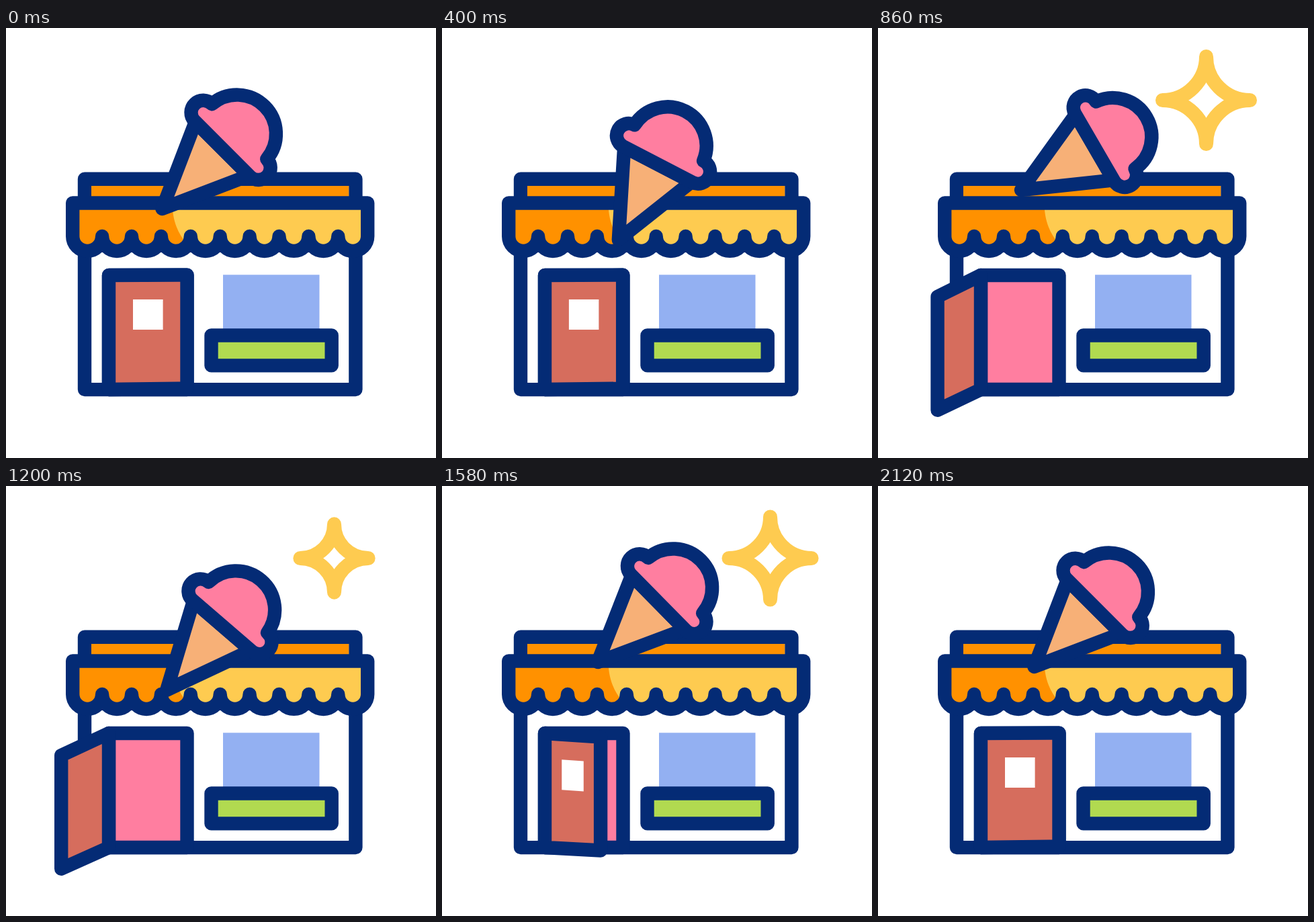
Write an HTML page that moves like this. It is 640 px wide and 640 px high and loops after 2400 ms.

```html
<!DOCTYPE html>
<html lang="en">
<head>
<meta charset="utf-8">
<title>Ice cream shop</title>
<style>
  html, body { margin: 0; height: 100%; overflow: hidden; background: #fff; }
  svg { display: block; width: 100vw; height: 100vh; }
  .line { stroke: #042b75; stroke-width: 20.4; stroke-linejoin: round; stroke-linecap: round; }
  .white { fill: #fff; }
  .orange { fill: #ff9100; }
  .yellow { fill: #fecb50; }
  .pink { fill: #ff7ea0; }
  .peach { fill: #f7b077; }
  .brown { fill: #d66d5d; }
  .blue { fill: #93b0f2; }
  .green { fill: #b1da50; }
  .none { fill: none; }
  #star { fill: none; stroke: #fecb50; stroke-width: 21; stroke-linejoin: round; stroke-linecap: round; }
</style>
</head>
<body>
<svg viewBox="0 0 640 640">
  <clipPath id="cut"><path class="awning"/></clipPath>

  <rect class="line white" x="117" y="224.8" width="403.4" height="313.3"/>
  <rect class="orange" x="127" y="235" width="383.2" height="22"/>

  <path class="awning yellow"/>
  <path class="orange" clip-path="url(#cut)" d="M90 250H247.5V262C248 284 254 303 268 320V345H90Z"/>
  <path class="awning line none"/>

  <rect class="blue" x="323" y="367.3" width="143.5" height="85"/>
  <rect class="line green" x="305.5" y="457.5" width="179.2" height="44.9"/>

  <rect class="line pink" x="153" y="368" width="116.5" height="170"/>
  <polygon id="leaf" class="line brown"/>
  <polygon id="pane" class="white"/>

  <g id="cone">
    <path class="line peach" d="M0 123.6L-56.4 -2.8H56.4Z"/>
    <path class="line pink" d="M-58.5 -2.8A18 18 0 0 1 -57.8 -38.8A58 58 0 0 1 57.8 -38.8A18 18 0 0 1 58.5 -2.8Z"/>
  </g>

  <path id="star"/>
</svg>
<script>
  const LOOP = 2400, STEP = 20;
  const $ = id => document.getElementById(id);
  const set = (id, name, value) => $(id).setAttribute(name, value);
  const show = (id, on) => $(id).style.display = on ? '' : 'none';

  // Eased progress from 0 to 1 between two times
  function ease(t, from, to) {
    const u = Math.min(1, Math.max(0, (t - from) / (to - from)));
    return (1 - Math.cos(Math.PI * u)) / 2;
  }

  // Eases through the turning points [time, value] of a swing
  function swing(t, ...turns) {
    return turns.slice(1).reduce((sum, [time, value], i) =>
      sum + (value - turns[i][1]) * ease(t, turns[i][0], time), turns[0][1]);
  }

  function drawCone(t) {
    const y = swing(t, [0, 181.6], [260, 217], [690, 168.7], [1200, 210.1], [1660, 172.6], [2120, 181.6]);
    const angle = swing(t, [0, 45], [400, 27.5], [880, 60], [1340, 35.6], [1800, 54], [2120, 45]);
    set('cone', 'transform', `translate(319.9 ${y}) rotate(${angle})`);
  }

  // The leaf and its pane shear as they turn on the left hinge
  function drawDoor(t) {
    const p = ease(t, 385, 935) - ease(t, 1160, 1740);
    const x = 269.5 - 189.5 * p;
    set('leaf', 'points', `153,368 ${x},${367.5 + 34 * p} ${x},${536.6 + 33.6 * p} 153,538`);
    const l = 189 - 61 * p, r = 233.6 - 129.5 * p;
    const yl = 404 + 18 * p, yr = 404 + 31 * p;
    set('pane', 'points', `${l},${yl} ${r},${yr} ${r},${yr + 45} ${l},${yl + 45}`);
    show('pane', l < r);
  }

  function drawStar(t) {
    const s = 0.1 + swing(t, [575, 0], [900, 67.4], [1305, 47.4], [1740, 67.4], [2110, 0]);
    const arc = (x, y) => `a${s} ${s} 0 0 0 ${x * s} ${y * s}`;
    set('star', 'd', `M488.5 ${107.5 - s}${arc(1, 1)}${arc(-1, 1)}${arc(-1, -1)}${arc(1, -1)}Z`);
    show('star', t > 560 && t < 2120);
  }

  const awning = 'M99.2 260.5H538.2V310' + 'a21.95 21.95 0 0 1 -43.9 0'.repeat(10) + 'Z';
  document.querySelectorAll('.awning').forEach(el => el.setAttribute('d', awning));

  const start = performance.now();
  function tick() {
    const now = (performance.now() - start) % LOOP;
    const t = Math.floor(now / STEP) * STEP;
    drawCone(t);
    drawDoor(t);
    drawStar(t);
    requestAnimationFrame(tick);
  }
  tick();
</script>
</body>
</html>
```
